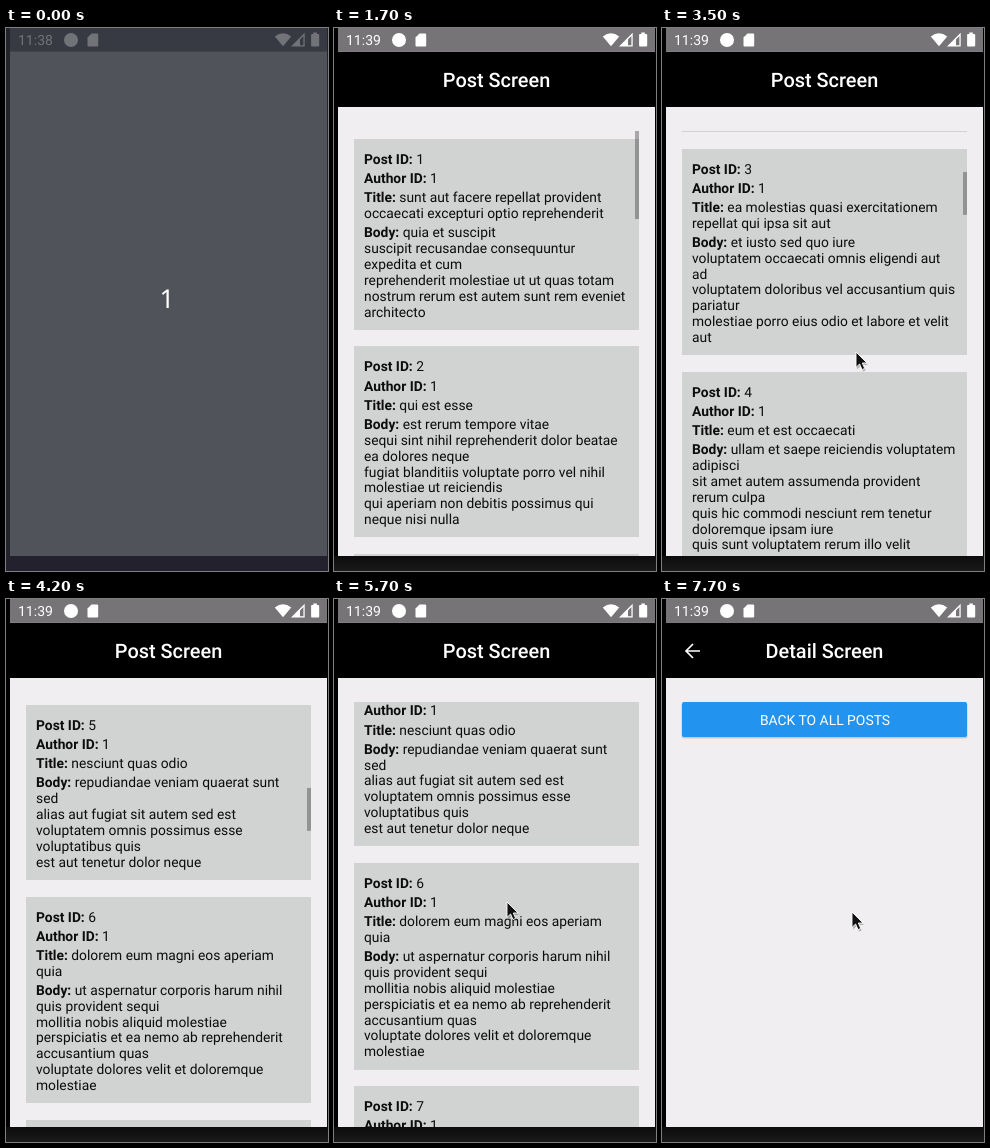
Recreate the animation shown at these times as an HTML page. Size 322 px wide and 543 px high, loop 8 s.

```html
<!DOCTYPE html>
<html lang="en">
<head>
<meta charset="utf-8">
<title>Post list</title>
<style>
html, body { margin: 0; width: 100%; height: 100%; overflow: hidden; background: #000; }
svg { display: block; width: 322px; height: 543px; font-family: Roboto, Arial, sans-serif; text-rendering: geometricPrecision; }
.post { font-size: 13.82px; fill: #0c0c0c; }
.post rect { shape-rendering: crispEdges; }
.post .label { font-weight: 700; }
.title { font-size: 19.9px; font-weight: 500; fill: #fff; text-anchor: middle; }
.one { font: 26px "Noto Sans", sans-serif; fill: #fff; text-anchor: middle; }
.button { font-size: 13.9px; fill: #fff; text-anchor: middle; }
</style>
</head>
<body>
<svg viewBox="0 0 322 543">
  <defs>
    <clipPath id="listClip"><rect x="4" y="103" width="317" height="425"/></clipPath>
    <clipPath id="appClip"><rect x="4" y="23.6" width="317" height="504.4"/></clipPath>
    <linearGradient id="shade" x2="0" y2="1">
      <stop stop-color="#0c0c0c"/><stop offset="1" stop-color="#1a1a1a"/>
    </linearGradient>
  </defs>

  <rect id="frame" width="322" height="543"/>
  <rect id="floor" y="528" width="322" height="15"/>
  <rect id="page" x="4" y="23" width="317" height="505"/>

  <g id="list" clip-path="url(#listClip)">
    <g id="posts"></g>
    <rect id="thumb" x="301" width="4" fill="#000"/>
  </g>

  <g id="header">
    <rect id="headerBar" x="4" y="23.6" width="317" fill="#000"/>
    <text id="headerTitle" class="title" x="162.5">Post Screen</text>
  </g>

  <g clip-path="url(#appClip)">
    <g id="detail">
      <rect x="4" y="23.6" width="317" height="504.4" fill="#f0eef1"/>
      <rect x="4" y="23.6" width="317" height="55.4" fill="#000"/>
      <path d="M38 52H24M31 45l-7 7 7 7" fill="none" stroke="#fff" stroke-width="1.7"/>
      <text class="title" x="162.5" y="59">Detail Screen</text>
      <rect x="19.5" y="104" width="286" height="35.5" rx="2.5" fill="#000" opacity=".16"/>
      <rect x="20" y="103" width="285" height="35" rx="2" fill="#2294f0"/>
      <text class="button" x="163" y="126">BACK TO ALL POSTS</text>
    </g>
  </g>

  <rect id="statusBar" x="4" width="317" height="23.6"/>
  <g id="status">
    <text id="clock" x="12" y="17" font-size="14"></text>
    <circle cx="65" cy="12" r="7"/>
    <path d="M85.5 5.5H91a1.2 1.2 0 0 1 1.2 1.2V17.3a1.2 1.2 0 0 1-1.2 1.2H82.7a1.2 1.2 0 0 1-1.2-1.2V9.5Z"/>
    <path d="M277 18.3L268.8 8.4Q277 2.2 285.2 8.4Z"/>
    <path d="M285 18.5H298.7V4.8ZM297.4 8V17.2H294V11.4Z" fill-rule="evenodd"/>
    <path d="M307.3 4.5h3.6v1.6h1.4a.9.9 0 0 1 .9.9V17.5a.9.9 0 0 1-.9.9H306a.9.9 0 0 1-.9-.9V7a.9.9 0 0 1 .9-.9h1.3Z"/>
  </g>

  <text id="one" class="one" x="161" y="280">1</text>
  <g id="cursor">
    <path d="M1 2V17.4L4.6 14 7 19.6 9.7 18.4 7.3 13H12Z" opacity=".25"/>
    <path d="M0 0V15.4L3.6 12 6 17.6 8.7 16.4 6.3 11H11Z" fill="#111" stroke="#fff" stroke-width=".9" stroke-linejoin="round"/>
  </g>
</svg>

<script>
const LOOP = 8000, STEP = 100;
const LINE = 15.83, ROW = 19.2, GAP = 16.5;
const VIEW_TOP = 103, VIEW_H = 425;
const FIRST_STOP = 405.4, LAST_STOP = 884.6;
const PRESSED = 5;

// "|" marks a line break
const posts = [
  ["sunt aut facere repellat provident|occaecati excepturi optio reprehenderit",
   "quia et suscipit|suscipit recusandae consequuntur|expedita et cum|reprehenderit molestiae ut ut quas totam|nostrum rerum est autem sunt rem eveniet|architecto"],
  ["qui est esse",
   "est rerum tempore vitae|sequi sint nihil reprehenderit dolor beatae|ea dolores neque|fugiat blanditiis voluptate porro vel nihil|molestiae ut reiciendis|qui aperiam non debitis possimus qui|neque nisi nulla"],
  ["ea molestias quasi exercitationem|repellat qui ipsa sit aut",
   "et iusto sed quo iure|voluptatem occaecati omnis eligendi aut|ad|voluptatem doloribus vel accusantium quis|pariatur|molestiae porro eius odio et labore et velit|aut"],
  ["eum et est occaecati",
   "ullam et saepe reiciendis voluptatem|adipisci|sit amet autem assumenda provident|rerum culpa|quis hic commodi nesciunt rem tenetur|doloremque ipsam iure|quis sunt voluptatem rerum illo velit"],
  ["nesciunt quas odio",
   "repudiandae veniam quaerat sunt|sed|alias aut fugiat sit autem sed est|voluptatem omnis possimus esse|voluptatibus quis|est aut tenetur dolor neque"],
  ["dolorem eum magni eos aperiam|quia",
   "ut aspernatur corporis harum nihil|quis provident sequi|mollitia nobis aliquid molestiae|perspiciatis et ea nemo ab reprehenderit|accusantium quas|voluptate dolores velit et doloremque|molestiae"],
  ["magnam facilis autem", "dolore placeat quibusdam"]
];

const $ = id => document.getElementById(id);
const set = (el, attrs) => { for (const k in attrs) el.setAttribute(k, attrs[k]); };
const show = (el, on) => set(el, { visibility: on ? "visible" : "hidden" });
const progress = (t, from, to) => Math.min(1, Math.max(0, (t - from) / (to - from)));
const mix = (a, b, p) => a + (b - a) * p;

function add(parent, tag, attrs, text) {
  const el = document.createElementNS("http://www.w3.org/2000/svg", tag);
  set(el, attrs);
  if (text !== undefined) el.textContent = text;
  return parent.appendChild(el);
}

function buildPosts() {
  let top = VIEW_TOP + 8;
  return posts.map(([title, body], i) => {
    const card = add($("posts"), "g", { class: "post" });
    const box = add(card, "rect", { x: 20, y: top, width: 285, fill: "#d1d3d2" });
    let y = top + 25;
    const rows = [["Post ID:", String(i + 1)], ["Author ID:", "1"], ["Title:", title], ["Body:", body]];
    for (const [label, value] of rows) {
      value.split("|").forEach((line, n) => {
        if (n) y += LINE;
        const text = add(card, "text", { x: 30, y });
        if (!n) add(text, "tspan", { class: "label" }, label);
        add(text, "tspan", {}, n ? line : " " + line);
      });
      y += ROW;
    }
    const height = y - ROW + 13.4 - top;
    set(box, { height });
    top += height + GAP;
    return card;
  });
}

const cards = buildPosts();

// Accelerating drag that runs out into a fling; a higher power brakes earlier.
const swipe = (t, from, to, power) => 1 - (1 - progress(t, from, to) ** 2) ** power;

const scrollAt = t =>
  FIRST_STOP * swipe(t, 2500, 3500, 2.62) +
  (LAST_STOP - FIRST_STOP) * swipe(t, 3500, 4800, 7.75);

// While dragging, the pointer moves with the list.
function cursorAt(t) {
  if (t < 2500 || (t > 3900 && t < 4800)) return null;
  if (t <= 3100) return [249 + 60 * (1 - progress(t, 2500, 2800)) ** 2, 362.5 - scrollAt(t)];
  if (t < 3500) {
    const p = progress(t, 3100, 3500);
    return [mix(249, 194, p), mix(83, 324, p * p)];
  }
  if (t <= 3900) return [mix(194, 210, progress(t, 3500, 3900)), 324 + FIRST_STOP - scrollAt(t)];
  if (t < 5700) {
    const p = progress(t, 4800, 5100);
    return [mix(190, 181, p), mix(182, 300, p)];
  }
  const p = progress(t, 6000, 6500);
  return [mix(173, 190, p) + 120 * p * (1 - p), mix(303, 313, p) - 12 * Math.sin(Math.PI * p)];
}

function thumbAlpha(t) {
  const fadeFrom = t < 2500 ? 1900 : 4900;
  const shown = t <= 2500 || t >= 2600;
  return shown ? 0.3 * (1 - progress(t, fadeFrom, fadeFrom + 200)) : 0;
}

function draw(time) {
  const t = Math.floor(time / STEP) * STEP;
  const dim = t < 200;

  set($("frame"), { fill: dim ? "#23232d" : "#000" });
  set($("floor"), { fill: dim ? "#23212d" : "url(#shade)" });
  set($("page"), { fill: dim ? "#505359" : "#f0eef1" });
  set($("statusBar"), { fill: dim ? "#373a42" : "#767477" });
  set($("status"), { fill: dim ? "#717378" : "#fff" });
  $("clock").textContent = t < 900 ? "11:38" : "11:39";
  show($("one"), dim);

  // The header first includes a doubled status bar inset.
  const inset = t < 800 ? 24 : 0;
  show($("header"), t >= 400);
  set($("headerBar"), { height: 55.4 + inset });
  set($("headerTitle"), { y: 59 + inset });

  // More posts load while scrolling, so the thumb shrinks.
  const scroll = scrollAt(t);
  const total = t < 2700 ? 2052 : t < 3200 ? 2288 : 4209;
  show($("list"), t >= 1700);
  set($("posts"), { transform: `translate(0 ${-scroll})` });
  set($("thumb"), {
    y: VIEW_TOP + scroll * VIEW_H / total,
    height: VIEW_H * VIEW_H / total,
    opacity: thumbAlpha(t)
  });
  set(cards[PRESSED], { opacity: mix(1, 0.2, progress(t, 6700, 6900)) });

  const open = 1 - (1 - progress(t, 7400, 7700)) ** 2;
  show($("detail"), open > 0);
  set($("detail"), {
    opacity: open,
    transform: `translate(162.5 276) scale(${mix(0.9, 1, open)}) translate(-162.5 -276)`
  });

  const at = cursorAt(t);
  show($("cursor"), at);
  if (at) set($("cursor"), { transform: `translate(${at})` });
}

const start = performance.now();
function tick() {
  draw((performance.now() - start) % LOOP);
  requestAnimationFrame(tick);
}
tick();
</script>
</body>
</html>
```
